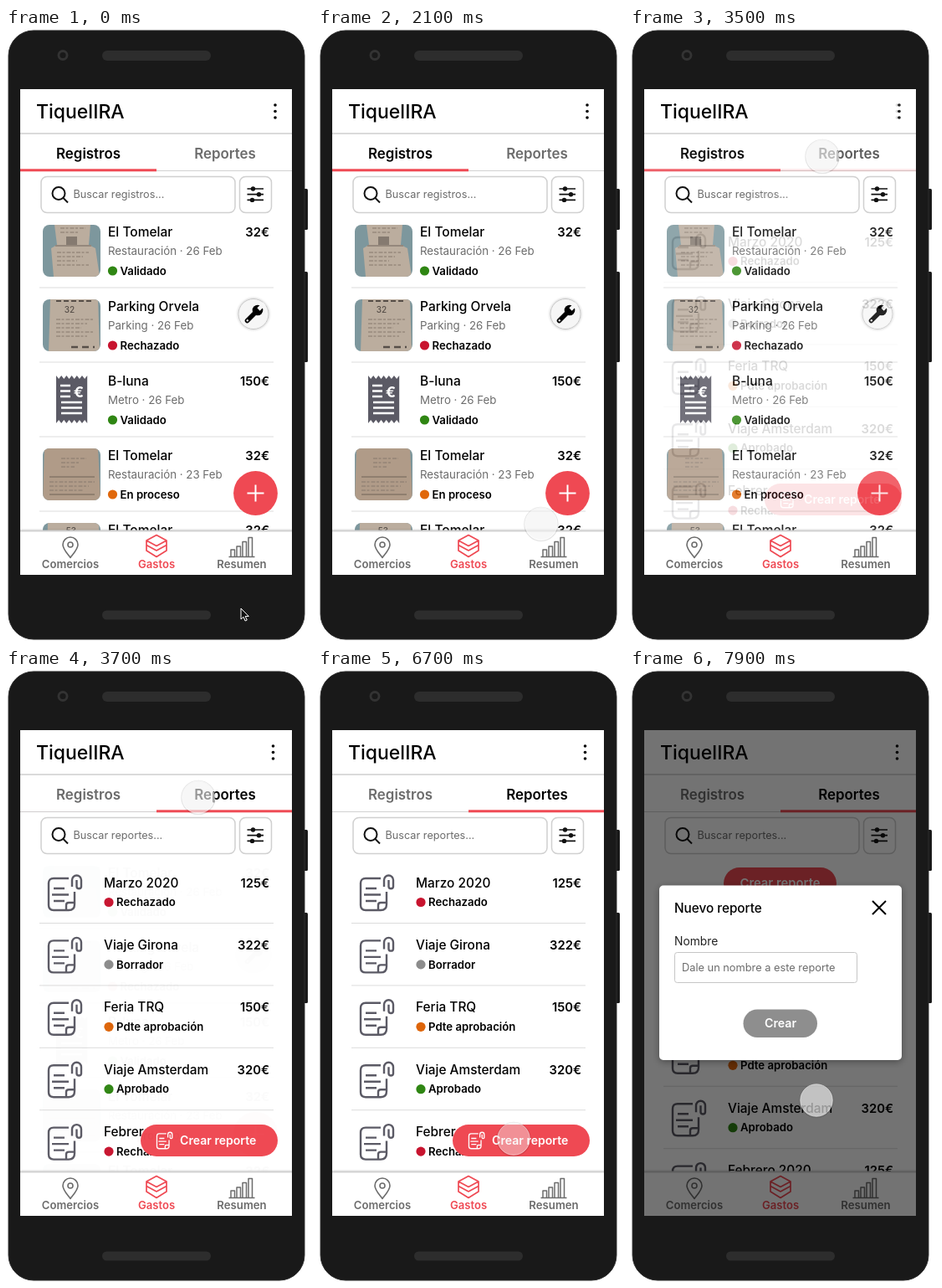
These frames come from a looping animation (366x732 px, 8000 ms). An HTML page:

```html
<!DOCTYPE html>
<html lang="es">
<head>
<meta charset="utf-8">
<style>
html, body { margin: 0; width: 100%; height: 100%; overflow: hidden; background: #fff; }
svg { display: block; width: 366px; height: 732px; font-family: Inter, "Open Sans", sans-serif; }
</style>
</head>
<body>
<svg id="stage" viewBox="0 0 366 732"></svg>
<script>
const RED = '#ef4953', GREY = '#6c6c6c', INK = '#5b5a65';
const DOTS = { Validado: '#2f8613', Aprobado: '#2f8613', Rechazado: '#c8142f', Borrador: '#8c8c8c',
  'En proceso': '#e0680c', 'Pdte aprobación': '#de650a' };

const rect = (x, y, w, h, r, fill, more = '') =>
  `<rect x="${x}" y="${y}" width="${w}" height="${h}" rx="${r}" fill="${fill}" ${more}/>`;
const circle = (x, y, r, fill, more = '') => `<circle cx="${x}" cy="${y}" r="${r}" fill="${fill}" ${more}/>`;
const line = (d, color, w, more = '') =>
  `<path d="${d}" fill="none" stroke="${color}" stroke-width="${w}" stroke-linejoin="round" ${more}/>`;
const text = (s, x, y, size, fill = '#000', weight = 500, anchor = 'start') =>
  `<text x="${x}" y="${y}" font-size="${size}" fill="${fill}" font-weight="${weight}" text-anchor="${anchor}">${s}</text>`;
const move = (x, y, body, scale = 1) => `<g transform="translate(${x} ${y}) scale(${scale})">${body}</g>`;
const panel = (fill, more) => rect(17, 73, 325, 580, 0, fill, more);

function status(name, x, y) {
  return circle(x, y, 5.6, DOTS[name]) + text(name, x + 9, y + 4.7, 13.2, '#000', 600);
}

// Blurred-out photo of a till receipt, 69 x 62
function photo(kind) {
  const rows = (x, y, n, w) => Array.from({ length: n }, (_, i) =>
    line(`M${x} ${y + i * 5}h${w - i % 3 * 7}`, '#86796d', 1, 'stroke-dasharray="5 1.5 3 2"')).join('');
  const paper = (d, fill = '#bbad9e') => `<path d="${d}" fill="${fill}"/>`;
  const art = [
    paper('M14 0H57L55 24 63 28 68 62H13L10 28 17 24z') + line('M15 25H58', '#95887c', 2) +
      rows(21, 4, 2, 30) + rect(28, 14, 13, 10, 0, '#857a70') + rows(17, 33, 4, 38),
    paper('M9 0H66L68 62H7z') + text(32, 32, 16, 10, '#574f49', 500, 'middle').replace('x="32"', 'x="32"') +
      line('M16 2H60', '#574f49', 2, 'stroke-dasharray="6 3"') + rows(16, 24, 5, 44) +
      line('M34 57H62', '#574f49', 2.5, 'stroke-dasharray="8 5"'),
    paper('M2 0H66L69 62H0z', '#b09b88') + rows(22, 12, 3, 30) + line('M8 34H62M8 55H62', '#6f6357', 1) + rows(8, 40, 3, 54),
    paper('M6 0H67L69 62H4z') + text(53, 34, 13, 10, '#574f49', 500, 'middle') + rows(16, 22, 6, 42)
  ][kind];
  return `<g clip-path="url(#thumb)">${rect(0, 0, 69, 62, 0, '#7d979d')}${art}</g>`;
}

function ticket() {
  const down = 'l3.1 4 3.1-4'.repeat(6), up = 'l-3.1-4-3.1 4'.repeat(6);
  return `<path d="M60 415${down}V472${up}z" fill="${INK}"/>` +
    line('M65 427h12M65 433.500h12M65 440h12M66 447h25M66 453.500h25M66 460h25', '#fff', 2.4) +
    text('€', 87, 441, 18, '#fff', 700, 'middle');
}

function wrench() {
  return circle(296, 341.5, 18, '#f6f6f6', 'stroke="#c9c9c9" filter="url(#soft)"') +
    line('M288.500 349.500L299 339', '#000', 5.5, 'stroke-linecap="round"') + circle(301, 337, 6.3, '#000') +
    line('M302 336L309 329', '#f6f6f6', 4.6) + circle(288.8, 349.2, 1.2, '#f6f6f6');
}

// Page with a paper clip, 41 x 43
function page(color, w) {
  return line('M25 4H7Q1 4 1 10V36Q1 42 7 42H25Q32 42 32 35V20M7 16H20M5 23.500H25M7 31H20M22 42V36Q22 33 25 33H32', color, w) +
    line('M29 14V6A5.500 5.500 0 0 1 40 6V14A2.800 2.800 0 0 1 34.500 14V6', color, w);
}

const divider = y => line(`M40 ${y}H320`, '#dcdcdc', 1);
const amount = (s, y) => text(s, 315, y, 14.8, '#000', 600, 'end');

function expenses() {
  const rows = [
    ['El Tomelar', 'Restauración · 26 Feb', 'Validado', '32€', 0],
    ['Parking Orvela', 'Parking · 26 Feb', 'Rechazado', '', 1],
    ['B-luna', 'Metro · 26 Feb', 'Validado', '150€'],
    ['El Tomelar', 'Restauración · 23 Feb', 'En proceso', '32€', 2],
    ['El Tomelar', 'Restauración · 23 Feb', 'Validado', '32€', 3]
  ];
  return rows.map(([name, info, state, sum, kind], i) => {
    const y = i * 89;
    return (kind === undefined ? ticket() : move(44, 235 + y, photo(kind))) +
      text(name, 122, 249 + y, 15.5) + text(info, 122, 270.5 + y, 13.3, GREY, 400) +
      status(state, 127.5, 290 + y) + amount(sum, 249 + y) + divider(310 + y);
  }).join('') + wrench() +
    circle(298.5, 555.5, 26.4, RED) + line('M288.500 555.500h20m-10-10v20', '#fff', 2);
}

function reports(shift) {
  const rows = [['Marzo 2020', 'Rechazado', 125], ['Viaje Girona', 'Borrador', 322],
    ['Feria TRQ', 'Pdte aprobación', 150], ['Viaje Amsterdam', 'Aprobado', 320], ['Febrero 2020', 'Rechazado', 125]];
  return rows.map(([name, state, sum], i) => {
    const y = i * 74.4 + shift;
    return move(50, 246 + y, page(INK, 2.4)) + text(name, 117, 260.5 + y, 15.4) +
      status(state, 123, 278.5 + y) + amount(sum + '€', 260.5 + y) + divider(303.5 + y);
  }).join('');
}

const pill = rect(161, 544, 164, 38, 19, RED) + move(180, 553, page('#fff', 2.8), .47) +
  text('Crear reporte', 208, 568, 14.1, '#fff', 600);

const dialog = panel('#000', 'opacity=".55"') +
  rect(35, 258.5, 290, 208.5, 5, '#fff', 'filter="url(#deep)"') +
  text('Nuevo reporte', 53, 291, 15.3) + line('M290 277l16 16m0-16l-16 16', '#000', 2) +
  text('Nombre', 53, 330, 13.8, '#222', 400) +
  rect(53.5, 338.5, 218, 36, 3, '#fff', 'stroke="#c6c6c6"') +
  text('Dale un nombre a este reporte', 62, 361, 12.8, GREY, 400) +
  rect(135.5, 406.5, 88.5, 33.5, 16.7, '#8e8e8e') + text('Crear', 180, 427.5, 14.2, '#fff', 600, 'middle');

function nav() {
  const bars = [[269, 623], [276, 619], [283, 613.5], [290, 608.5]].map(([x, y]) => `M${x} 631V${y}h4.500V631`).join('');
  return rect(17, 600, 326, 53, 0, '#fff', 'filter="url(#soft)"') + line('M17 600.500H342', '#d2d2d2', 2) +
    line('M77 632.500C72 626 68 622 68 617A9 9 0 0 1 86 617C86 622 82 626 77 632.500z', GREY, 1.6) +
    circle(77, 617, 3, 'none', `stroke="${GREY}" stroke-width="1.6"`) +
    line('M180 605.500l12 6.500-12 6.500-12-6.500zM168 612v5.500l12 6.500 12-6.500V612M168 617.500v6.500l12 7.500 12-7.500V617.500', RED, 1.7) +
    line(bars + 'M266.500 631.500H297.500', GREY, 1.5) +
    text('Comercios', 77, 644.5, 13.1, GREY, 600, 'middle') +
    text('Gastos', 180, 644.5, 13.1, RED, 600, 'middle') +
    text('Resumen', 282, 644.5, 13.2, GREY, 600, 'middle');
}

function screen(id, tab, list, front = '') {
  const dotX = tab ? 319.5 : 322, tint = on => on ? '#000' : GREY;
  return `<g id="${id}" clip-path="url(#screen)">` + panel('#fff') + list +
    text('TiquelIRA', 36, 107.5, 23) + [92, 99.5, 107].map(y => circle(dotX, y, 1.8, '#000')).join('') +
    line('M17 126H343', '#dadada', 2) + line('M17 170.500H343', '#d2d2d2', 1) +
    text('Registros', 98.5, 155.5, 16.9, tint(!tab), 600, 'middle') +
    text('Reportes', 262, 155.5, 16.9, tint(tab), 600, 'middle') +
    rect(tab ? 180 : 17, 168.3, 163, 3, 0, RED) +
    rect(42, 177.5, 232, 43, 7, '#fff', 'stroke="#d0d0d0" stroke-width="1.5"') +
    rect(279.5, 177.5, 38, 43, 7, '#fff', 'stroke="#d0d0d0" stroke-width="1.5"') +
    circle(63, 197.5, 7.5, 'none', 'stroke="#111" stroke-width="2"') + line('M68.500 203L74 208.500', '#111', 2) +
    text(`Buscar ${tab ? 'reportes' : 'registros'}...`, 80.5, 203.3, 12.7, GREY, 400) +
    line('M288.500 192h19.500m-19.500 6.700h19.500m-19.500 6.700h19.500', '#111', 1.7) +
    circle(295.5, 192, 2.7, '#111') + circle(302.5, 198.7, 2.7, '#111') + circle(294.5, 205.4, 2.7, '#111') +
    nav() + front + '</g>';
}

const shade = (id, dy, blur, alpha) => `<filter id="${id}" x="-30%" y="-30%" width="160%" height="160%">
  <feDropShadow dx="0" dy="${dy}" stdDeviation="${blur}" flood-opacity="${alpha}"/></filter>`;
const topPill = rect(112, 237, 135, 38, 19, RED) + text('Crear reporte', 179.5, 261, 14.8, '#fff', 600, 'middle');

stage.innerHTML = `<defs><clipPath id="screen">${panel('#fff')}</clipPath>
  <clipPath id="thumb">${rect(0, 0, 69, 62, 8, '#fff')}</clipPath>
  ${shade('soft', 0, 1.8, .28)}${shade('deep', 2, 4, .35)}</defs>` +
  rect(354, 192, 7, 49, 1.5, '#191919') + rect(354, 291, 7, 108, 1.5, '#191919') +
  rect(3, 3, 354, 727, 30, '#191919', 'stroke="#2c2c2c"') +
  circle(68, 32.5, 6.5, '#333') + circle(68, 32.5, 3.6, '#191919') +
  rect(115, 27, 130, 12, 6, '#2d2d2d') + rect(115, 695.5, 130, 11, 5.5, '#2d2d2d') +
  screen('records', 0, expenses()) + screen('list', 1, reports(0) + pill) +
  screen('form', 1, topPill + reports(46), dialog) +
  `<g id="touch">${circle(0, .5, 20, 'none', 'stroke="#000" stroke-opacity=".1" stroke-width="1.5"')}
    ${circle(0, 0, 19.3, '#f3f3f3', 'id="tip" stroke="#fff" stroke-opacity=".5"')}</g>
  <path id="arrow" d="M0 0V13L3 10.300 5.100 15 7.300 14 5.200 9.500H9.300z" fill="#111" stroke="#fff"/>`;

// time, x, y of the pointer
const PATH = [[0, 281, 693], [1550, 281, 693], [2100, 267, 593], [2250, 254, 430], [2400, 234, 218],
  [2600, 231, 165], [2800, 230, 153], [4450, 230, 153], [4800, 229, 330], [5100, 229, 480], [5400, 230, 529],
  [5800, 233, 555], [6100, 234, 561], [7620, 234, 561], [7900, 223, 515], [8000, 223, 515]];
const ramp = (t, a, b) => Math.min(1, Math.max(0, (t - a) / (b - a)));

function pointer(t) {
  const i = Math.max(1, PATH.findIndex(p => p[0] >= t)), [a, b] = [PATH[i - 1], PATH[i]];
  const k = ramp(t, a[0], b[0]);
  return [a[1] + (b[1] - a[1]) * k, a[2] + (b[2] - a[2]) * k];
}

const el = id => document.getElementById(id);
const fade = (id, k) => {
  el(id).setAttribute('opacity', k);
  el(id).style.display = k ? '' : 'none';
};
const start = performance.now();

function draw(now) {
  const t = Math.max(0, now - start) % 8000, [x, y] = pointer(t), inside = y < 653;
  const pressed = t >= 6600 && t < 6900;
  fade('list', ramp(t, 3468, 3705));
  fade('form', ramp(t, 6720, 6900));
  fade('touch', +inside);
  fade('arrow', +!inside);
  el('tip').setAttribute('fill-opacity', pressed ? .42 : .62);
  for (const id of ['touch', 'arrow']) el(id).setAttribute('transform', `translate(${x} ${y})`);
  requestAnimationFrame(draw);
}
draw(start);
</script>
</body>
</html>
```
